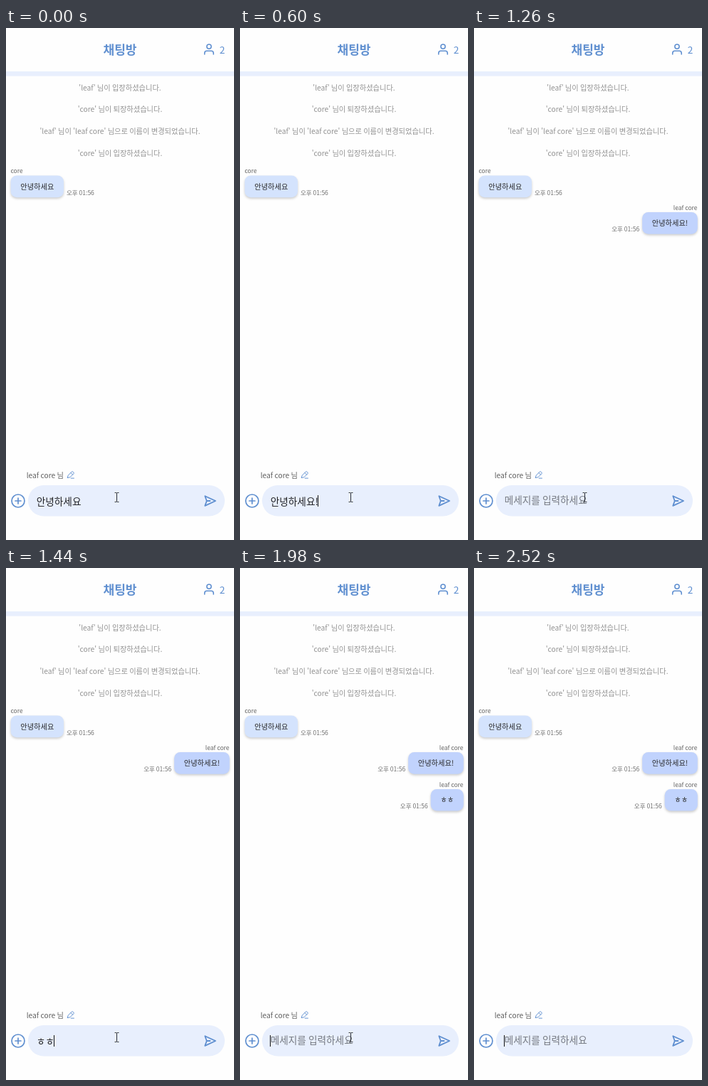
Recreate the animation shown at these times as an HTML page with a canvas. Size 320x720 px, loop 2580 ms.

```html
<!DOCTYPE html>
<html lang="ko">
<head>
<meta charset="utf-8">
<title>채팅방</title>
<style>
html, body { margin: 0; width: 100%; height: 100%; overflow: hidden; background: #fefefe; }
canvas { display: block; width: 320px; height: 720px; }
</style>
</head>
<body>
<canvas id="stage" width="320" height="720"></canvas>
<script>
const LOOP = 2580;
const UNIT = 320 / 375;
const BLUE = '#5f8fd0';
const PALE = '#e8effd';
const FONT = '"Noto Sans CJK KR", "Noto Sans KR", "Noto Sans CJK", "Noto Sans", sans-serif';
const GUEST = 'core';
const ME = 'leaf core';
const HELLO = '안녕하세요';
const FIELD_X = 42.7;

const canvas = document.getElementById('stage');
const dpr = window.devicePixelRatio || 1;
canvas.width = 320 * dpr;
canvas.height = 720 * dpr;
const ctx = canvas.getContext('2d', { alpha: false });

const within = (t, spans) => spans.some(([from, to]) => t >= from && t < to);

// Sizes are CSS px of the 375-wide layout; y is the visual middle of the glyphs.
function text(str, x, y, size, color, { align = 'left', weight = 400 } = {}) {
  const px = size * UNIT;
  ctx.font = `${weight} ${px}px ${FONT}`;
  ctx.textAlign = align;
  ctx.fillStyle = color;
  ctx.fillText(str, x, y + px * 0.375);
  return ctx.measureText(str).width;
}

function pill(x, y, w, h, r, color) {
  ctx.fillStyle = color;
  ctx.beginPath();
  ctx.roundRect(x, y, w, h, r);
  ctx.fill();
}

function icon(x, y, scale, path, width, color = BLUE) {
  ctx.save();
  ctx.translate(x, y);
  ctx.scale(scale, scale);
  ctx.strokeStyle = color;
  ctx.lineWidth = width;
  ctx.lineCap = ctx.lineJoin = 'round';
  ctx.stroke(new Path2D(path));
  ctx.restore();
}

function header() {
  text('채팅방', 160, 30.3, 20, BLUE, { align: 'center', weight: 700 });
  icon(275.6, 20.6, 0.78, 'M20 21v-2a4 4 0 0 0-4-4H8a4 4 0 0 0-4 4v2M16 7a4 4 0 1 1-8 0a4 4 0 1 1 8 0', 2);
  text('2', 307.2, 30.7, 16, BLUE, { align: 'right', weight: 500 });
  ctx.fillStyle = PALE;
  ctx.fillRect(0, 61, 320, 6.6);
}

function notices() {
  [
    "'leaf' 님이 입장하셨습니다.",
    `'${GUEST}' 님이 퇴장하셨습니다.`,
    `'leaf' 님이 '${ME}' 님으로 이름이 변경되었습니다.`,
    `'${GUEST}' 님이 입장하셨습니다.`
  ].forEach((line, i) => text(line, 160, 83.8 + i * 30.75, 12, '#929292', { align: 'center' }));
}

function message(str, top, mine) {
  ctx.font = `500 ${12 * UNIT}px ${FONT}`;
  const w = ctx.measureText(str).width + 32 * UNIT;
  const x = mine ? 313.8 - w : 6.6;
  const align = mine ? 'right' : 'left';
  text(mine ? ME : GUEST, mine ? 313.5 : 6.4, top - 6.5, 10, '#666', { align });
  ctx.save();
  ctx.shadowColor = 'rgba(0, 0, 0, 0.2)';
  ctx.shadowBlur = 3.5 * dpr;
  ctx.shadowOffsetY = 1.8 * dpr;
  pill(x, top, w, 30.7, 8.5, mine ? '#c1d3fd' : '#d4e3fd');
  ctx.restore();
  text(str, x + 16 * UNIT, top + 15.6, 12, '#2b2b2b', { weight: 500 });
  text('오후 01:56', mine ? x - 4 : x + w + 4, top + 24.2, 10, '#707070', { align });
}

function composer(value, caret) {
  const name = text(ME + ' 님', 28.7, 629, 12, '#606060', { weight: 500 });
  icon(28.7 + name + 4, 622.8, 0.48, 'M3 20l1.5-6.5L15.5 2.5a2 2 0 0 1 3 0l2.5 2.5a2 2 0 0 1 0 3L10 19L3 20M12.5 5.5l5.5 5.5M13 21.5h9', 2);
  icon(17, 665, 1, 'M9 0a9 9 0 1 1-18 0a9 9 0 1 1 18 0M-4 0h8M0-4v8', 1.7);
  pill(31, 643, 276, 43.5, 21.75, PALE);
  icon(278.5, 657.5, 1, 'M0.8 0.8L15.6 7.5L0.8 14.4L3.2 7.5L0.8 0.8M3.2 7.5H8', 1.8);
  let width = 0;
  if (value) width = text(value, FIELD_X, 665.6, 16, '#202124', { weight: 500 });
  else text('메세지를 입력하세요', FIELD_X, 664.2, 16, '#757980');
  if (caret) {
    ctx.fillStyle = '#111';
    ctx.fillRect(Math.round(FIELD_X + width - 0.4), 657, 1, 16);
  }
}

function beam() {
  icon(155.5, 660, 1, 'M-2.5-6.5h1.5l1 .7l1-.7h1.5M0-6V6M-2.5 6.5h1.5l1-.7l1 .7h1.5', 1, '#2a2d33');
}

function arrow() {
  const shape = new Path2D('M135.6 647.2V661.6L138.9 658.6L141.2 663.8L143.4 662.8L141.2 657.8H145.6Z');
  ctx.fillStyle = '#fff';
  ctx.fill(shape);
  ctx.strokeStyle = '#222';
  ctx.lineWidth = 1;
  ctx.lineJoin = 'miter';
  ctx.stroke(shape);
}

function typed(t) {
  if (t < 540) return HELLO;
  if (t < 780) return HELLO + '!';
  if (t < 1320) return '';
  if (t < 1440) return 'ㅎ';
  return t < 1680 ? 'ㅎㅎ' : '';
}

function draw(t) {
  ctx.setTransform(dpr, 0, 0, dpr, 0, 0);
  ctx.fillStyle = '#fefefe';
  ctx.fillRect(0, 0, 320, 720);
  header();
  notices();
  message(HELLO, 207.6, false);
  if (t >= 780) message(HELLO + '!', 259, true);
  if (t >= 1680) message('ㅎㅎ', 310.9, true);
  composer(typed(t), within(t, [[540, 780], [1020, 1260], [1320, 1680], [1980, 2280], [2500, LOOP]]));
  if (t < 2280) beam();
  else if (t < 2340) arrow();
}

const start = performance.now();
function tick() {
  draw((performance.now() - start) % LOOP);
  requestAnimationFrame(tick);
}
tick();
</script>
</body>
</html>
```
